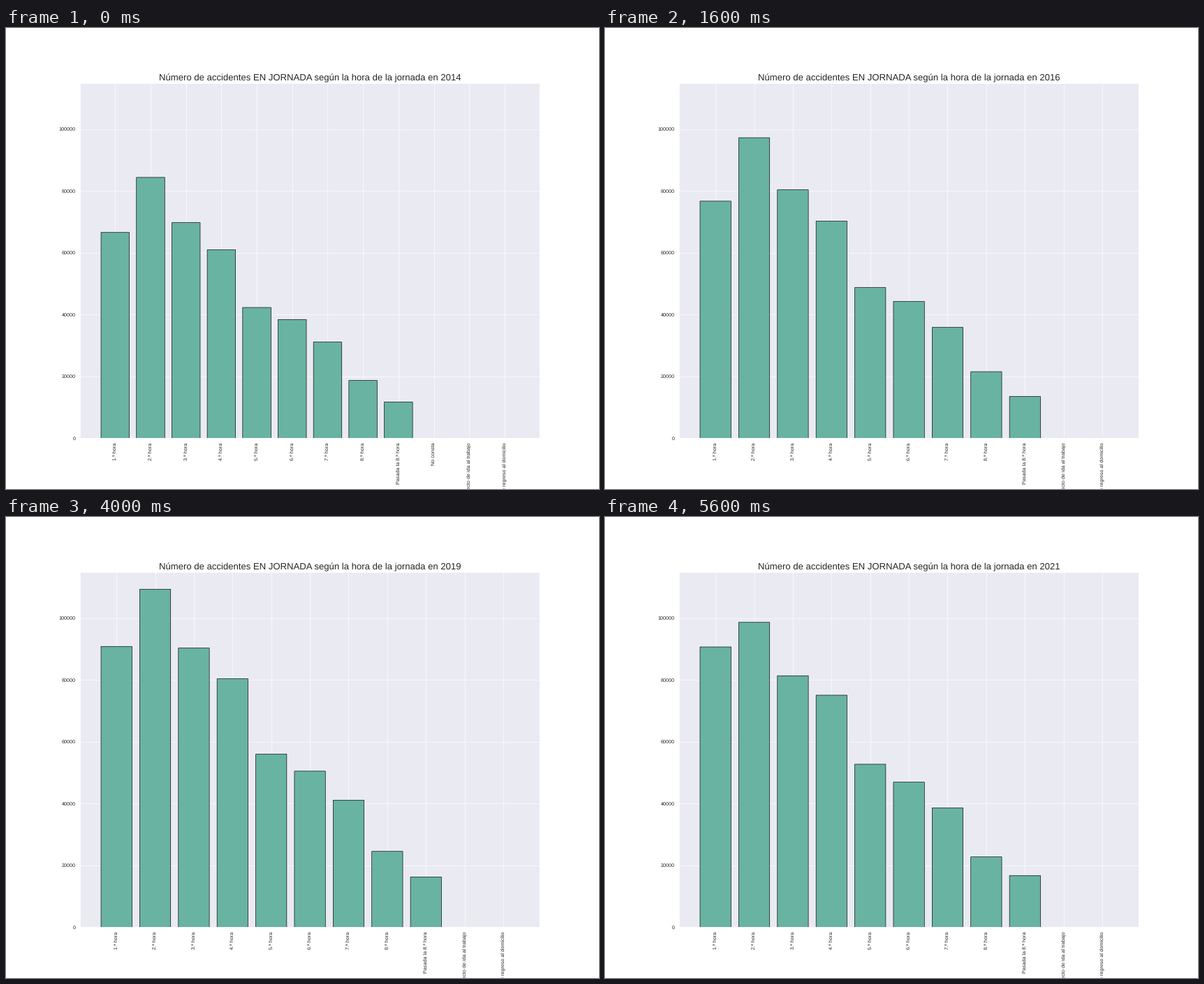
These frames come from a looping animation (849 by 660 pixels, 6.4 s). A matplotlib script:

```python
import matplotlib.pyplot as plt
import numpy as np
from matplotlib.animation import FuncAnimation

WIDTH, HEIGHT, DPI = 849, 660, 48
PT = WIDTH / 18 / DPI  # point sizes are laid out for an 18 inch wide chart
INK = "#262626"

plt.rcParams.update({
    "font.family": "Liberation Sans",
    "text.color": INK,
    "text.hinting": "none",
    "axes.facecolor": "#eaeaf2",
    "axes.edgecolor": "white",
    "axes.linewidth": 1.25 * PT,
    "axes.axisbelow": True,
    "axes.grid": True,
    "axes.titlesize": 20 * PT,
    "axes.titlepad": 6 * PT,
    "grid.color": "white",
    "grid.linewidth": PT,
})
for axis in ("xtick", "ytick"):
    plt.rcParams.update({
        axis + ".color": INK,
        axis + ".labelsize": 11 * PT,
        axis + ".major.size": 0,
        axis + ".major.pad": 9.5 * PT,
    })

# Accidents per year, in thousands, and their split over the working hours:
# steady until 2018, then drifting evenly to the late split in 2021.
FIRST_YEAR = 2014
TOTALS = [424, 457.7, 488.5, 511, 532.4, 559.2, 445.7, 523.2]
EARLY = np.array([157, 199, 164.5, 143.8, 99.8, 90.6, 73.4, 44.1, 27.7])
LATE = np.array([173.3, 188.5, 155.5, 143.5, 100.8, 89.7, 73.8, 43.5, 32])

HOURS = [f"{n}.ª hora" for n in range(1, 9)] + ["Pasada la 8.ª hora"]
TRIPS = ["Trayecto de ida al trabajo", "Trayecto de regreso al domicilio"]

fig = plt.figure(figsize=(WIDTH / DPI, HEIGHT / DPI), dpi=DPI, facecolor="white")
ax = fig.add_axes([0.125, 0.11, 0.775, 0.77])


def counts(year):
    drift = max(0, year - 2018) / 3
    return TOTALS[year - FIRST_YEAR] * (EARLY + (LATE - EARLY) * drift)


def draw(i):
    year = FIRST_YEAR + i
    # the "No consta" category exists only in the first two years
    labels = HOURS + (["No consta"] if year < 2016 else []) + TRIPS
    values = np.zeros(len(labels))
    values[:len(HOURS)] = counts(year)

    ax.clear()
    ax.bar(range(len(labels)), values, width=0.8, color="#69b3a2",
           edgecolor="black", linewidth=PT, snap=False)
    ax.set_xticks(range(len(labels)), labels, rotation=90)
    ax.set_yticks(range(0, 100001, 20000))
    ax.set_ylim(0, 114800)
    ax.set_title("Número de accidentes EN JORNADA según la hora "
                 f"de la jornada en {year}")
    return ax.patches


anim = FuncAnimation(fig, draw, frames=len(TOTALS), init_func=lambda: draw(0),
                     interval=800, repeat=True, repeat_delay=0)
plt.show()
```
